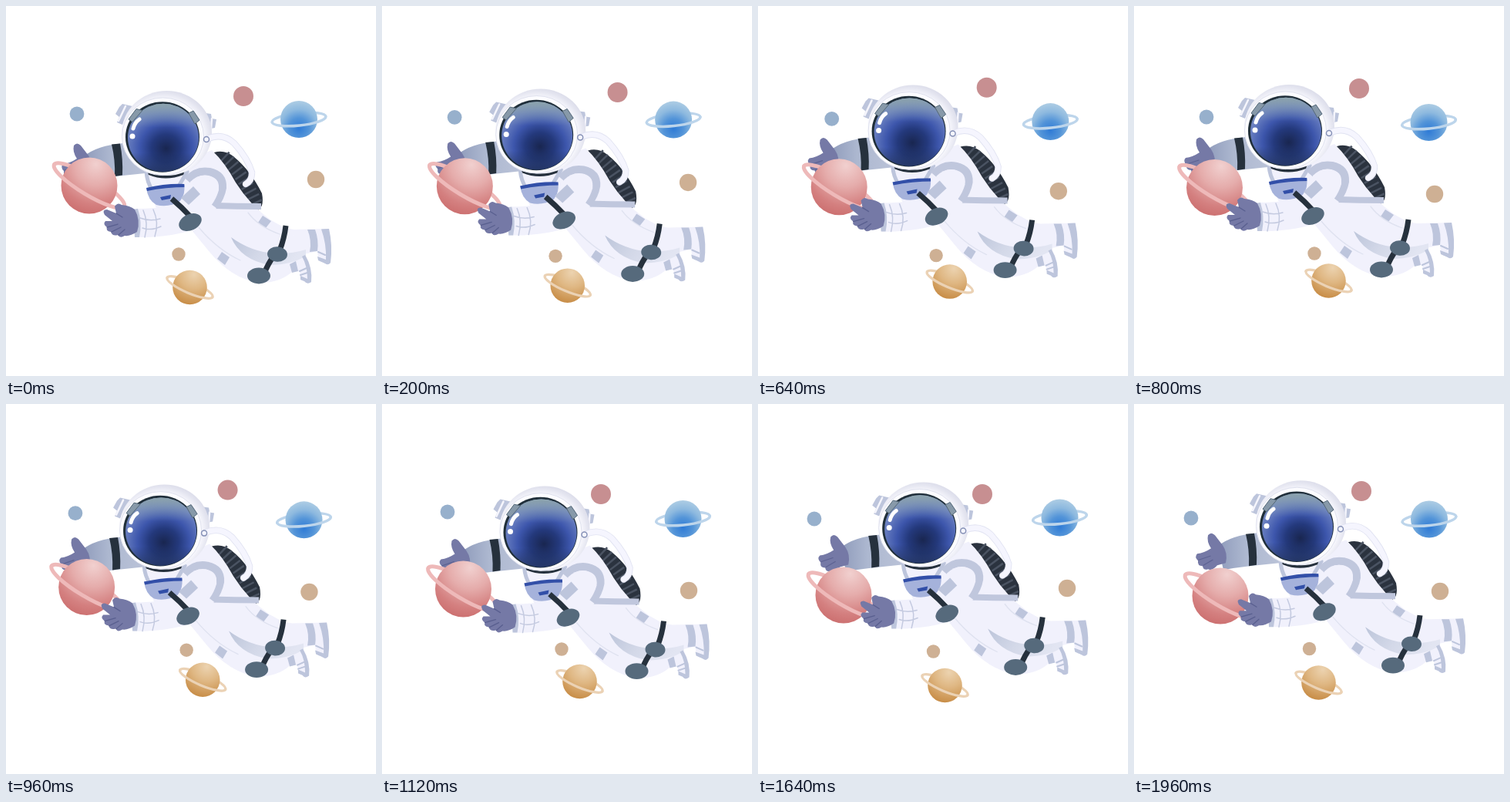
Write an HTML page that moves like this. It is 480x480 px and loops after 2 s.

```html
<!DOCTYPE html>
<html lang="en">
<head>
<meta charset="utf-8">
<title>Floating astronaut</title>
<style>
  html, body { margin: 0; width: 100%; height: 100%; overflow: hidden; background: #fff; }
  svg { display: block; width: 100vw; height: 100vh; }
  .suit { fill: #f1f1fc; }
  .trim { fill: #bdc5dc; }
  .pad { fill: #566a7c; }
  .glove { fill: #7579a6; }
  .line { fill: none; stroke-linecap: round; stroke-linejoin: round; }
  .strap { fill: none; stroke: #26313d; stroke-width: 7; }
</style>
</head>
<body>
<svg viewBox="0 0 480 480">
  <defs>
    <radialGradient id="rose" cx=".62" cy=".12" r=".95">
      <stop offset="0" stop-color="#f1d0cf"/><stop offset=".4" stop-color="#e5acab"/>
      <stop offset=".75" stop-color="#d48080"/><stop offset="1" stop-color="#ca6c6c"/>
    </radialGradient>
    <radialGradient id="sky" cx=".5" cy=".74" r=".78">
      <stop offset="0" stop-color="#2f7bd6"/><stop offset=".35" stop-color="#5394d8"/>
      <stop offset=".65" stop-color="#8db9df"/><stop offset="1" stop-color="#b3d0e5"/>
    </radialGradient>
    <radialGradient id="amber" cx=".62" cy=".12" r=".95">
      <stop offset="0" stop-color="#ecd3b0"/><stop offset=".45" stop-color="#dfb783"/>
      <stop offset="1" stop-color="#c58840"/>
    </radialGradient>
    <radialGradient id="shell" cx=".46" cy=".55" r=".58">
      <stop offset=".78" stop-color="#f6f6fc"/><stop offset=".9" stop-color="#e4e5f0"/>
      <stop offset="1" stop-color="#d9dae8"/>
    </radialGradient>
    <radialGradient id="glass" cx=".54" cy=".66" r=".74">
      <stop offset="0" stop-color="#192650"/><stop offset=".28" stop-color="#24397c"/>
      <stop offset=".5" stop-color="#3d56ac"/><stop offset=".74" stop-color="#677dc0"/>
      <stop offset="1" stop-color="#8c9fc0"/>
    </radialGradient>
    <linearGradient id="sheen" x1="0" y1="0" x2="0" y2="1">
      <stop offset="0" stop-color="#8ca3ac"/><stop offset=".35" stop-color="#7f98b5" stop-opacity="0"/>
      <stop offset=".72" stop-color="#1c2c50" stop-opacity="0"/>
      <stop offset="1" stop-color="#1c2c50" stop-opacity=".75"/>
    </linearGradient>
    <linearGradient id="shade" x1="0" y1="0" x2="1" y2=".3">
      <stop offset="0" stop-color="#bcc5da"/><stop offset=".5" stop-color="#d3d8e8"/>
      <stop offset="1" stop-color="#e2e5f2"/>
    </linearGradient>
    <linearGradient id="sleeve">
      <stop offset="0" stop-color="#8f9bbb"/><stop offset=".4" stop-color="#adb8d0"/>
      <stop offset="1" stop-color="#bcc4d9"/>
    </linearGradient>
  </defs>

  <g id="dots"></g>
  <g id="planets"></g>

  <g id="farArm">
    <path fill="url(#sleeve)" d="M101 195Q118 181 152 178L190 182V216L142 221Q124 223 108 226Z"/>
    <path fill="#26313d" d="M137 179.5L148 178.5Q152 199 151 219.5L141 221Q142 200 137 179.5Z"/>
    <path class="glove" d="M88 181Q92 176 97 181L107 194Q114 204 111 217L100 220Q93 228 88 225Q82 227 81 221Q74 221 75 214Q70 209 74 205Q83 204 92 198Q86 189 88 181Z"/>
    <path class="line" stroke="#5d6292" stroke-width="1.2" d="M76 213L91 208M82 220L94 213"/>
  </g>

  <g id="giant"></g>

  <g id="astronaut">
    <!-- backpack -->
    <path fill="#2b333f" d="M270 190Q284 186 296 196Q317 213 332 243Q336 264 323 266L280 235Z"/>
    <path class="line" stroke="#4a5362" stroke-width="17" stroke-dasharray="2.5 5.5" style="stroke-linecap:butt" d="M283 195Q307 217 325 257"/>

    <!-- far leg -->
    <path class="suit" d="M318 260Q340 286 374 290L419 289Q423 311 421 333Q416 338 411 332Q405 334 404 318Q370 327 338 325Z"/>
    <path class="trim" d="M391 290L401 290Q406 304 404 318L394 319Q397 304 391 290ZM409 289.5L419 289Q424 311 421 333Q418 337 414 334L405 330L404 325L415 329Q416 309 409 289.5Z"/>
    <path class="line" stroke="#bdc5dc" stroke-width="2" d="M405 319L414 323"/>

    <!-- torso and near leg -->
    <path class="suit" d="M181 212L250 194L267 187Q284 203 298 229Q317 259 344 278Q370 291 386 310L389 324Q398 340 396 358Q391 362 387 357Q381 358 381 344L371 345Q354 360 327 359Q292 353 264 319L237 286L196 264Q183 240 181 212Z"/>
    <path fill="url(#shade)" d="M292 300Q318 319 349 321Q370 322 389 316L389 324Q371 336 342 336Q304 329 292 300Z"/>
    <path class="trim" d="M368 335L376 331L379 344L371 346ZM388 323Q398 340 396 358Q391 362 387 357L382 355V350L391 354Q391 337 384 325Z"/>
    <path class="line" stroke="#bdc5dc" stroke-width="2" d="M381 344L390 340M382 349L391 346"/>
    <path class="trim" d="M333 272L344 279L337 288L327 281ZM280 319L290 326L284 336L274 328Z"/>
    <path class="line" stroke="#c0c7dd" stroke-width="8" style="stroke-linecap:butt" d="M270 259Q299 260 331 260"/>
    <path class="line" stroke="#dfe2f0" stroke-width="1.3" d="M249 286Q274 316 304 330M314 268Q327 286 355 296"/>
    <path class="strap" d="M363 285Q361 302 355 317M347 325Q340 334 335 347"/>
    <ellipse class="pad" cx="352" cy="322" rx="13" ry="9.8" transform="rotate(4 352 322)"/>
    <ellipse class="pad" cx="328" cy="350" rx="15" ry="10.4"/>

    <!-- chest -->
    <path class="line" stroke="#bdc5dc" stroke-width="5" d="M182 215Q183 229 190 239M235 215L225 232"/>
    <path fill="#a5b2db" d="M182 236L233 231L235 237L226 253Q211 262 195 258Q184 252 182 236Z"/>
    <path fill="#324fa8" d="M182 236Q207 230 232 231L234 235Q207 235 183 240ZM200 248L214 245L213 250L202 252Z"/>

    <!-- near arm -->
    <path class="suit" d="M231 228Q242 211 263 212Q286 217 284 239Q275 268 248 288Q216 301 168 300L165 263Q198 263 220 258Q234 250 231 228Z"/>
    <path class="line" stroke="#c0c7dd" stroke-width="10" style="stroke-linecap:butt" d="M235 226Q247 212 264 215Q282 219 281 236Q279 248 270 260"/>
    <path class="suit" d="M239 228Q249 218 262 220Q277 225 276 239Q270 260 251 273L235 253Z"/>
    <path class="trim" d="M227 249L243 234L252 244L237 258Z"/>
    <path class="strap" d="M215 250Q228 261 240 274"/>
    <ellipse class="pad" cx="239" cy="280.5" rx="15.5" ry="10.5" transform="rotate(-25 239 280.5)"/>
    <path class="line" stroke="#c4cae0" stroke-width="1.5" d="M178 265Q185 281 180 300M191 264Q199 281 193 299M174 275Q187 280 200 276M177 288Q188 292 201 286"/>
    <path class="trim" d="M165 264L171 263Q177 281 173 300L167 300Z"/>

    <!-- near glove -->
    <path class="glove" d="M141 260Q145 254 150 258Q161 259 167 264Q175 278 170 293Q161 299 154 298Q148 302 145 297Q138 299 136 293Q129 292 131 287Q125 283 129 279L138 279L128 271Q124 264 131 264L143 269Z"/>
    <path class="line" stroke="#595f8f" stroke-width="1.3" d="M131 287L145 283M137 293L149 287M146 297L154 290M143 269L151 274"/>

    <!-- helmet -->
    <path fill="#26313d" d="M182 211Q207 221 233 211L230 219Q207 228 185 219Z"/>
    <path class="trim" d="M151 127L164 130L151 154L144 151L147 144L142 140L147 131ZM259 139L266 140L267 146L273 147L271 158L266 159L263 171Z"/>
    <path class="line" stroke="#f5f5fc" stroke-width="2.5" d="M155 130L146 149M267 146L266 160"/>
    <ellipse cx="208.5" cy="165" rx="58.5" ry="55" fill="url(#shell)"/>
    <ellipse cx="203.5" cy="169.3" rx="53" ry="50.3" fill="#fcfcff" stroke="#dfe1ee" stroke-width="1"/>
    <ellipse cx="203" cy="170" rx="48" ry="45.8" fill="#202f3a"/>
    <ellipse cx="204" cy="170.8" rx="46" ry="44" fill="url(#glass)"/>
    <ellipse cx="204" cy="170.8" rx="46" ry="44" fill="url(#sheen)"/>
    <path fill="#8799a9" stroke="#546878" stroke-width="1" d="M159 147L169 133.5L177 135.5L164 150.5ZM237 139L243 136L251 148L245 153Z"/>
    <path class="line" stroke="#fff" stroke-width="5" d="M165 159Q167 151 173 147"/>
    <circle cx="164" cy="169" r="3.5" fill="#fff"/>

    <!-- hose -->
    <g class="line">
      <path id="hose" stroke="#e1e3f2" stroke-width="8.5" d="M262 172Q281 164 296 178Q314 198 319 216Q319 227 311 231"/>
      <use href="#hose" style="display:none"/>
      <path stroke="#f5f5fe" stroke-width="6.8" d="M262 172Q281 164 296 178Q314 198 319 216Q319 227 311 231"/>
    </g>
    <circle cx="260" cy="173" r="3.5" fill="#f4f5fe" stroke="#8792b7" stroke-width="1.5"/>
  </g>
</svg>
<script>
const LOOP = 2000, STEP = 40;
const TIMES = [0, 440, 800, 1120, 1320, 1640, 1960];
const BODY_TIMES = [0, 440, 800, 1120, 1320, 1640, 1800, 1960];
const $ = id => document.getElementById(id);

const points = text => text.split(' ').map(pair => pair.split(',').map(Number));
const movers = [];

function addMover(node, path, times = TIMES) {
  movers.push({ node, path: points(path), times });
}

function addGroup(parent, markup, path) {
  const node = document.createElementNS('http://www.w3.org/2000/svg', 'g');
  node.innerHTML = markup;
  $(parent).append(node);
  addMover(node, path);
}

const dot = (r, color) => `<circle r="${r}" fill="${color}"/>`;

function planet(r, fill, rx, ry, tilt, color, width) {
  const half = sweep => `<path class="line" stroke="${color}" stroke-width="${width}"
    transform="rotate(${tilt})" d="M${-rx} 0A${rx} ${ry} 0 0 ${sweep} ${rx} 0"/>`;
  return half(1) + `<circle r="${r}" fill="url(#${fill})"/>` + half(0);
}

addGroup('dots', dot(13, '#c78f91'), '308,117 302,107 292,107 284,117 284,120 291,117 295,113');
addGroup('dots', dot(11.2, '#ceb094'), '402,225 392,234 390,244 398,242 402,239 401,239 397,243');
addGroup('dots', dot(9.4, '#97b0cc'), '92,140 96,148 94,144 85,140 80,142 73,149 74,148');
addGroup('dots', dot(8.7, '#ceb094'), '224,322 227,326 234,321 233,318 230,318.5 227.5,321 227.5,317.5');
addGroup('planets', planet(24, 'sky', 35, 8, -6, '#bdd5eb', 3.5),
  '380,147 377,148.5 382.5,151 390.5,149 392.5,147 391.5,147.5 383,149.5');
addGroup('planets', planet(22.3, 'amber', 32, 7.5, 23, '#ebd2b5', 3.3),
  '238.5,365 244,360 252.5,356.5 256.5,360 253,363 242.5,365 239.5,361.5');
addGroup('giant', planet(36.5, 'rose', 53, 12, 31, '#eeb9b9', 5),
  '108,233 106.5,234.5 104.5,235.5 105.5,240 108,244 111,248 112,249');

const bodyPath = '0,0 -5.7,-5.3 -7,-8 2.5,-3.4 8,-10.7 6.2,-8.5 8,-12.3 8,-10.8';
addMover($('farArm'), bodyPath, BODY_TIMES);
addMover($('astronaut'), bodyPath, BODY_TIMES);

// Cubic Hermite through unevenly timed points.
function sample(path, times, t, axis) {
  const last = times.length - 1;
  let i = 0;
  while (i < last - 1 && t > times[i + 1]) i++;
  const slope = k => {
    const a = Math.max(k - 1, 0), b = Math.min(k + 1, last);
    return (path[b][axis] - path[a][axis]) / (times[b] - times[a]);
  };
  const span = times[i + 1] - times[i];
  const u = Math.min((t - times[i]) / span, 1), v = 1 - u;
  return path[i][axis] * (1 + 2 * u) * v * v + path[i + 1][axis] * (3 - 2 * u) * u * u
    + span * u * v * (slope(i) * v - slope(i + 1) * u);
}

function draw(ms) {
  const t = Math.floor((ms % LOOP) / STEP) * STEP;
  for (const { node, path, times } of movers) {
    const [x, y] = [0, 1].map(axis => sample(path, times, t, axis).toFixed(2));
    node.setAttribute('transform', `translate(${x} ${y})`);
  }
}

const start = performance.now();
function tick() {
  draw(performance.now() - start);
  requestAnimationFrame(tick);
}
tick();
</script>
</body>
</html>
```
